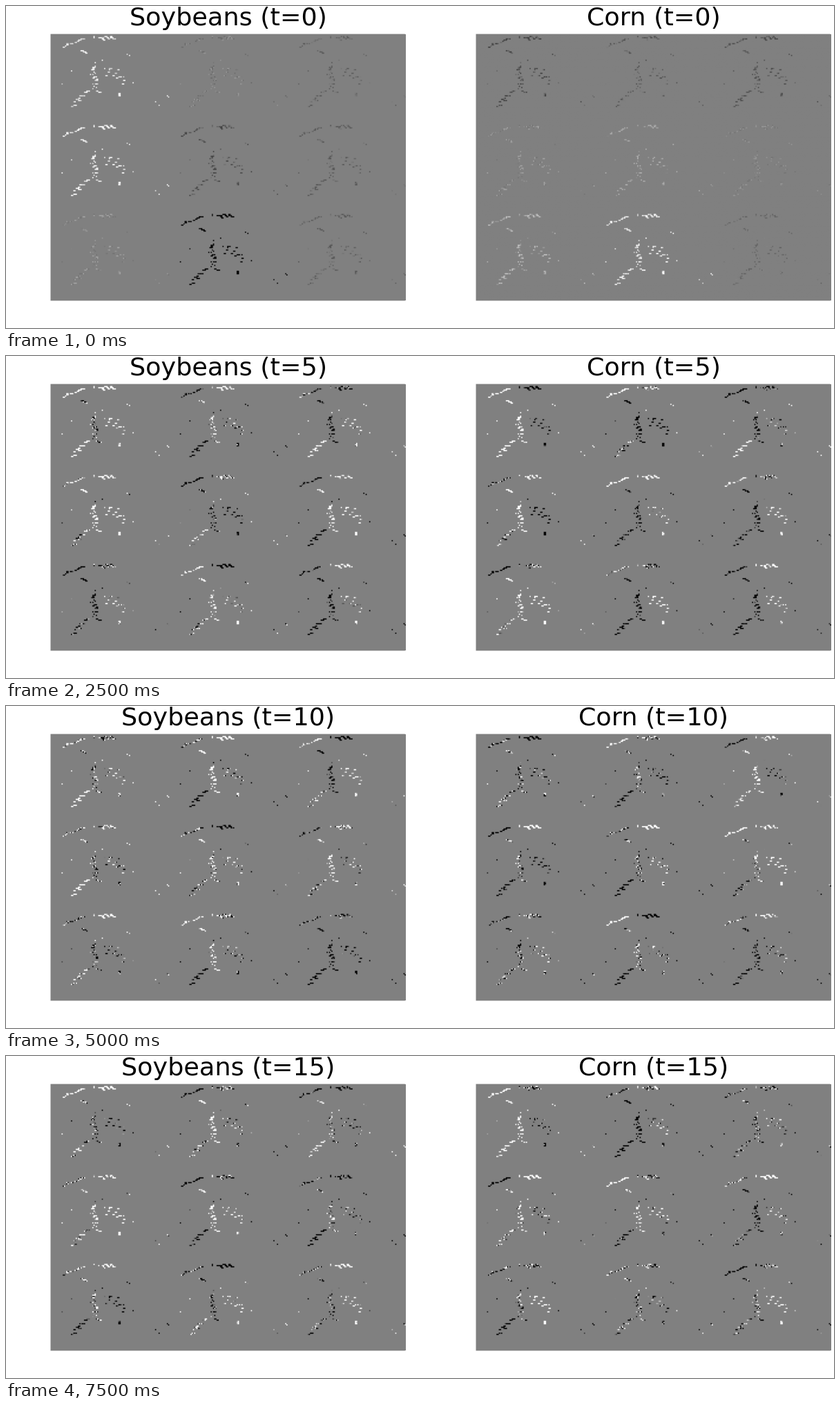
A matplotlib script for the animation above (8 s loop, 1199 by 467 pixels).

```python
import numpy as np
import matplotlib.pyplot as plt
from matplotlib.animation import FuncAnimation
from matplotlib.patches import Rectangle

W, H, DPI = 1199, 467, 128
STEPS, STEP_MS = 16, 500
ROWS, COLS = 75, 100  # cells per map; each panel shows 3 x 3 maps
PANEL_W, TOP, BOTTOM = 513.3, 40.6, 427.4
BARE = 0.5

rng = np.random.default_rng(12)


def streak(start, end, runs, jitter):
    """Short horizontal runs of cells scattered along a line."""
    along = np.linspace(start, end, runs)
    spots = np.rint(along + rng.normal(0, jitter, along.shape)).astype(int)
    lengths = rng.choice([1, 2, 3], runs, p=[0.4, 0.4, 0.2])
    return [(col + i, max(row, 2)) for (col, row), n in zip(spots, lengths)
            for i in range(n)]


def field_regions():
    """Groups of (column, row) cells that change tone together."""
    road = streak((10, 10), (27, 4), 16, (0.5, 0.5))
    band = [(36, 2), (36, 3)] + streak((40, 3), (52, 3), 18, (0.6, 0.8))
    clump = streak((25, 14), (29, 15), 5, (0.5, 0.5))
    head = streak((34, 29), (37, 29), 7, (0.4, 1.1))
    stem = streak((36, 32), (38, 49), 18, (1.5, 0.6))
    east = streak((46, 30), (60, 39), 14, (3, 3.2))
    tail = streak((30, 48), (17, 60), 11, (0.7, 0.6))
    block = [(c, r) for c in (57, 58) for r in (50, 51, 52)]
    strays = [(43, 22), (37, 24), (64, 17), (66, 18), (69, 41), (17, 31),
              (9, 42), (88, 57), (91, 60), (98, 52), (99, 53)]
    return [road, band, clump + head + stem, east + block, tail + strays]


REGIONS = field_regions()
COL, ROW = np.concatenate(REGIONS).T
REGION = np.repeat(np.arange(len(REGIONS)), [len(r) for r in REGIONS])

# Grey of each map at the first step
SOY_START = [0.9, 0.5, 0.42, 0.95, 0.35, 0.4, 0.55, 0.0, 0.4]
CORN_START = [0.33, 0.4, 0.35, 0.55, 0.6, 0.52, 0.67, 0.9, 0.45]
START = np.array([SOY_START, CORN_START])[:, :, None]
GAIN = np.tile([1, 1, 0.7], 3)[:, None]  # right-hand maps stay softer


def waves(count):
    """Random phases and speeds for each crop, map and part."""
    shape = (2, 9, count)
    return rng.uniform(0, 2 * np.pi, shape), rng.uniform(0.25, 0.7, shape)


REGION_WAVES = waves(len(REGIONS))
CELL_WAVES = waves(len(COL))


def levels_at(step):
    """Grey of every cell, drifting from soft tones to hard contrast."""
    growth = 1 - np.exp(-step / 2.5)
    phase, speed = REGION_WAVES
    drift = (np.sin(phase + speed * step) - np.sin(phase))[:, :, REGION]
    phase, speed = CELL_WAVES
    speckle = np.sin(phase + speed * step)
    start = BARE + (START - BARE) * (1 - 0.7 * growth)
    change = growth * 0.8 * drift + (0.1 + 0.7 * growth) * speckle
    return np.clip(start + GAIN * change, 0, 1)


def mosaic(levels):
    grid = np.full((3 * ROWS, 3 * COLS), BARE)
    for i, values in enumerate(levels):
        grid[i // 3 * ROWS + ROW, i % 3 * COLS + COL] = values
    return grid


fig = plt.figure(figsize=(W / DPI, H / DPI), dpi=DPI, facecolor="white")


def panel(left):
    x, y = left / W, 1 - BOTTOM / H
    w, h = PANEL_W / W, (BOTTOM - TOP) / H
    fig.add_artist(Rectangle((x, y), w, h, color="#808080", lw=0, zorder=-1,
                             transform=fig.transFigure, snap=False))
    ax = fig.add_axes([x, y, w, h])
    ax.axis("off")
    image = ax.imshow(np.full((3 * ROWS, 3 * COLS), BARE), cmap="gray",
                      vmin=0, vmax=1, aspect="auto")
    title = fig.text(x + w / 2 + 0.7 / W, 1 - 28 / H, "", ha="center",
                     va="baseline", family="DejaVu Sans", size=20.5)
    return image, title


PANELS = [("Soybeans", *panel(64.5)), ("Corn", *panel(680.5))]


def draw(step):
    for (name, image, title), levels in zip(PANELS, levels_at(step)):
        image.set_data(mosaic(levels))
        title.set_text(f"{name} (t={step})")
    return [artist for p in PANELS for artist in p[1:]]


anim = FuncAnimation(fig, draw, frames=STEPS, interval=STEP_MS, repeat=True)
plt.show()
```
